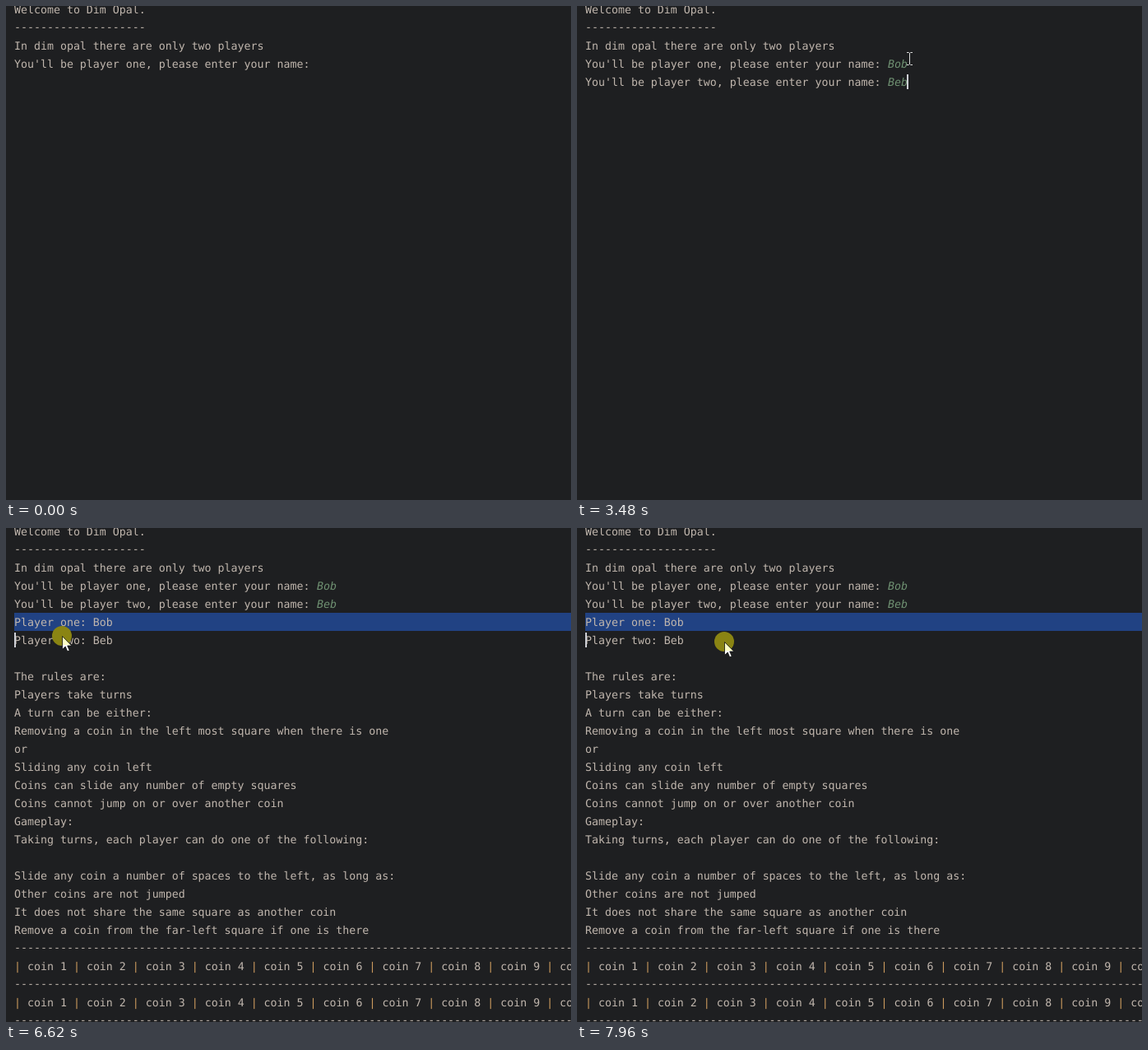
These frames come from a looping animation (687x600 px, 8 s). An HTML page:

```html
<!DOCTYPE html>
<html lang="en">
<head>
<meta charset="utf-8">
<title>Console game</title>
<style>
html, body { margin: 0; width: 100%; height: 100%; overflow: hidden; background: #1e1f21; }
svg { display: block; width: 687px; height: 600px; }
text {
  font-family: "DejaVu Sans Mono", "Noto Sans Mono", monospace;
  font-size: 13.289px;
  fill: #c0b6ad;
  white-space: pre;
  text-rendering: geometricPrecision;
}
.pipe { fill: #cb9a5e; }
.input { fill: #6f9172; font-style: italic; }
</style>
</head>
<body>
<svg viewBox="0 0 687 600">
  <defs>
    <linearGradient id="tint" gradientUnits="userSpaceOnUse" x1="0" y1="0" x2="0" y2="20">
      <stop offset=".54" stop-color="#ffffc4"/>
      <stop offset=".56" stop-color="#fff"/>
    </linearGradient>
  </defs>
  <rect width="687" height="600" fill="#1e1f21"/>
  <rect id="selection" x="10" y="103" width="677" height="22" fill="#214283"/>
  <g id="lines"></g>
  <rect id="caret" width="2" height="18" fill="#ced0d6"/>
  <circle id="press" r="12" fill="#8a8413"/>
  <path id="beam" d="M-3.5-7.5H-.8M.8-7.5H3.5M0-7V7M-3.5 7.5H-.8M.8 7.5H3.5" fill="none" stroke="#dcdcdc"/>
  <path id="arrow" d="M.5.5V16.5L4.2 13L6.7 18.8L9.2 17.8L6.7 12H11.8Z" fill="url(#tint)" stroke="#111" stroke-width=".8"/>
</svg>
<script>
const LOOP = 8000, STEP = 66.8, LEAD = 10;
const LEFT = 10, CHAR = 8, LINE = 22, FOLD = 125;
const NAME_COL = 46;
const PROMPTS = [3, 4];

const rule = "-".repeat(86);
const coins = Array.from({ length: 10 }, (_, i) => `| coin ${i + 1} `).join("");
const script = [
  "Welcome to Dim Opal.",
  "-".repeat(20),
  "In dim opal there are only two players",
  "You'll be player one, please enter your name:",
  "You'll be player two, please enter your name:",
  "Player one: Bob",
  "Player two: Beb",
  "",
  "The rules are:",
  "Players take turns",
  "A turn can be either:",
  "Removing a coin in the left most square when there is one",
  "or",
  "Sliding any coin left",
  "Coins can slide any number of empty squares",
  "Coins cannot jump on or over another coin",
  "Gameplay:",
  "Taking turns, each player can do one of the following:",
  "",
  "Slide any coin a number of spaces to the left, as long as:",
  "Other coins are not jumped",
  "It does not share the same square as another coin",
  "Remove a coin from the far-left square if one is there",
  rule, coins, rule, coins, rule
];

// Steps at which each letter of a name is typed
const typed = [
  { name: "Bob", at: [21, 26, 30] },
  { name: "Beb", at: [45, 50, 52] }
];

// Pointer path: step, x, y
const path = [
  [1, 634, 578], [2, 560, 420], [3, 492, 270], [4, 440, 150], [5, 412, 84],
  [6, 404, 64], [72, 404, 64], [73, 365, 61], [75, 270, 80], [78, 130, 122],
  [81, 77, 131], [85, 90, 114], [86, 80, 113], [90, 17.5, 113], [93, 17.5, 113],
  [94, 9, 113], [98, 9, 113], [99, 68, 131], [102, 120, 142], [105, 120, 142],
  [106, 128, 136], [109, 150, 111], [112, 173, 123], [113, 155, 130],
  [114, 137, 131], [116, 137, 131], [117, 155, 135], [118, 170, 138], [119, 179, 138]
];

const el = id => document.getElementById(id);
const selection = el("selection"), caret = el("caret"), press = el("press");
const beam = el("beam"), arrow = el("arrow");
const show = (node, on) => node.setAttribute("visibility", on ? "visible" : "hidden");
const move = (node, x, y) => node.setAttribute("transform", `translate(${x} ${y})`);

function addText(row, col, content, cls = "") {
  const node = document.createElementNS("http://www.w3.org/2000/svg", "text");
  const lift = content.startsWith("--") ? 1 : 0;
  node.setAttribute("x", LEFT + col * CHAR);
  node.setAttribute("y", 9 + row * LINE - lift);
  node.setAttribute("class", cls);
  node.innerHTML = content.replace(/\|/g, '<tspan class="pipe">|</tspan>');
  el("lines").append(node);
  return node;
}

const rows = script.map((content, i) => addText(i, 0, content));
const names = PROMPTS.map(row => addText(row, NAME_COL, "", "input"));

function pointerAt(n) {
  const next = path.findIndex(p => p[0] >= n);
  if (next < 0) return path[path.length - 1].slice(1);
  if (next === 0) return path[0].slice(1);
  const [n0, x0, y0] = path[next - 1], [n1, x1, y1] = path[next];
  const k = (n - n0) / (n1 - n0);
  return [x0 + (x1 - x0) * k, y0 + (y1 - y0) * k];
}

function rowCount(n) {
  if (n < 40) return 4;
  if (n < 57) return 5;
  return n < 60 ? 27 : 28;
}

// Caret cell as [row, column], or null while it is off
function caretCell(n, lengths, y) {
  if (n < 7 || (n >= 15 && n < 21)) return null;
  if (n < 37) return [3, NAME_COL + lengths[0]];
  if (n < 40) return [4, 0];
  if (n < 57) return [4, NAME_COL + lengths[1]];
  if (n < 95) return null;
  return [y < FOLD ? 5 : 6, 0];
}

function draw(t) {
  const n = Math.floor((t + LEAD) / STEP);
  const [x, y] = pointerAt(n);

  const count = rowCount(n);
  rows.forEach((node, i) => show(node, i < count));

  const lengths = typed.map(({ at }) => at.filter(s => n >= s).length);
  names.forEach((node, i) => {
    node.textContent = typed[i].name.slice(0, lengths[i]);
  });

  const cell = caretCell(n, lengths, y);
  show(caret, cell);
  if (cell) {
    const [row, col] = cell;
    const nudge = col ? -1 : 0;
    move(caret, LEFT + col * CHAR + nudge, row * LINE - 5);
  }

  show(selection, n >= 99 && y >= FOLD);

  const dragging = n >= 95;
  const clicking = n >= 6 && n < 9;
  show(press, dragging || clicking);
  move(press, clicking ? 402 : x, clicking ? 63 : y);

  show(beam, n >= 1 && n < 94);
  move(beam, Math.floor(x) + 0.5, Math.round(y));
  show(arrow, n >= 94);
  move(arrow, x, y);
}

const start = performance.now();
function tick() {
  draw((performance.now() - start) % LOOP);
  requestAnimationFrame(tick);
}
tick();
</script>
</body>
</html>
```
